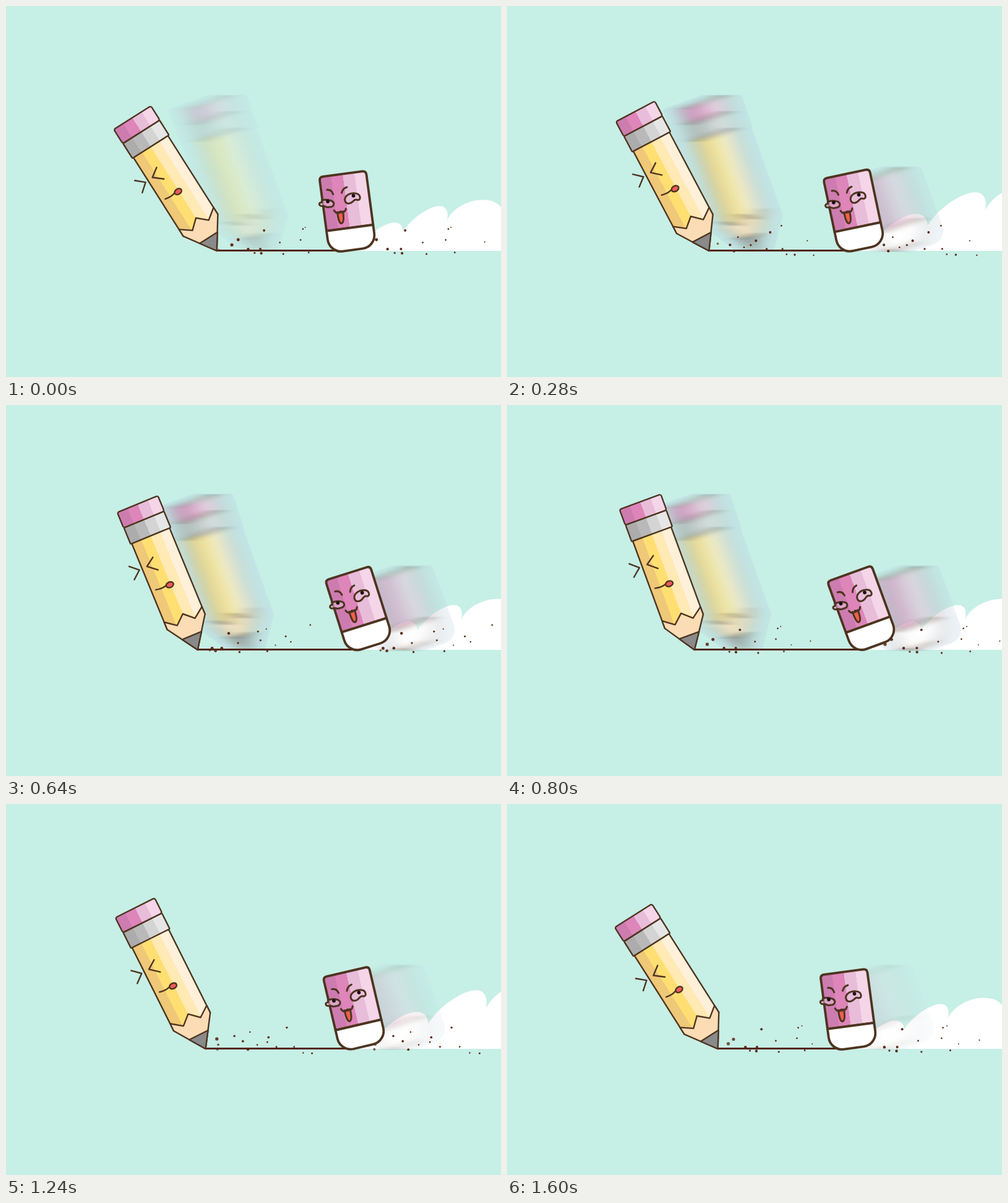
An HTML page that plays this animation: 800 by 600 pixels, repeating every 1640 ms.

```html
<!DOCTYPE html>
<html lang="en">
<head>
<meta charset="utf-8">
<title>Pencil and eraser</title>
<style>
  html, body { margin: 0; width: 100%; height: 100%; overflow: hidden; background: #c6efe6; }
  svg { display: block; width: 800px; height: 600px; }
  .ink { stroke: #4d3420; stroke-linejoin: round; stroke-linecap: round; }
  .bare { fill: none; }
</style>
</head>
<body>
<svg viewBox="0 0 800 600">
  <defs>
    <!-- Sideways blur over a flat bluish halo -->
    <filter id="smear" filterUnits="userSpaceOnUse" x="0" y="100" width="800" height="320" color-interpolation-filters="sRGB">
      <feMorphology in="SourceAlpha" operator="dilate" radius="29 0" result="wide"/>
      <feFlood flood-color="#bcd6e6" flood-opacity=".5"/>
      <feComposite operator="in" in2="wide" result="halo"/>
      <feGaussianBlur in="SourceGraphic" stdDeviation="14 0" result="blur"/>
      <feComposite in="blur" in2="wide" operator="in" result="core"/>
      <feMerge><feMergeNode in="halo"/><feMergeNode in="core"/></feMerge>
    </filter>

    <!-- Origin: tip of the lead -->
    <g id="pencil" class="ink" stroke-width="2.4">
      <rect x="-33" y="-200" width="66" height="151" fill="url(#yellow)"/>
      <path fill="#fcdcb4" d="M-33-62L-15.5-49 0-63 15.5-49 33-62V-49L0 0-33-49Z"/>
      <path fill="#8a8a8a" d="M-17-25H17L0 0Z"/>
      <rect x="-35" y="-228" width="70" height="28.5" rx="1.5" fill="url(#grey)"/>
      <rect x="-35.5" y="-255" width="71" height="27" rx="3" fill="url(#pink)"/>
    </g>
    <g id="pencilFace" class="ink" stroke-width="2.4">
      <path class="bare" d="M-10-166L-24.3-156-10-144M-51-167L-37.8-155.3-51.4-144"/>
      <path class="bare" d="M-25.5-115.5Q-16-113-8-115.5"/>
      <ellipse cx="-1.5" cy="-114.5" rx="6.2" ry="4.4" fill="#ee5a5a"/>
    </g>

    <!-- Origin: middle of the sleeve edge -->
    <g id="eraser" class="ink" stroke-width="3.8">
      <path fill="url(#pink)" d="M-38 0V-82q0-6 6-6H32q6 0 6 6V0Z"/>
      <path fill="#fff" d="M-38 0H38V14A22 22 0 0 1 16 36H-16A22 22 0 0 1-38 14Z"/>
    </g>
    <g id="eraserFace" class="ink" stroke-width="3">
      <path class="bare" d="M-28.5-66Q-21-66-19.5-57.5M4-66Q-3-65-5.5-58"/>
      <g fill="#e8bdd9" fill-opacity=".6">
        <path d="M-39-50Q-31-52-23-47C-18-43-21-37-28-38C-35-37-35-41-38-41C-45-40-46-48-39-47Z"/>
        <path d="M-2-46C-1-53 8-57 17-54C25-52 24-42 19-43C15-45 14-44 11-42C6-38-2-38-2-46Z"/>
      </g>
      <path fill="#f0604a" d="M-16.5-28Q-17-9-12.4-9Q-7-10-7.5-28Q-12-25-16.5-28Z"/>
      <path class="bare" d="M-21.5-31.5Q-18-23-11.7-28.5Q-5-24-2.2-31.5"/>
      <g fill="#1c1010" stroke="none">
        <circle cx="-29.7" cy="-47" r="2.9"/>
        <circle cx="12.7" cy="-50.8" r="2.9"/>
      </g>
    </g>
  </defs>

  <rect width="800" height="600" fill="#c6efe6"/>
  <path id="cloud" fill="#fff" d="M0 0L43.5-34C62-47 84-53 86.5-31C100-58 165-98 157.5-50C172-82 232-95 246-68L400-60V0Z"/>
  <g id="eraserTrail" filter="url(#smear)"><use href="#eraser"/></g>
  <g id="pencilTrail" filter="url(#smear)"><use href="#pencil"/></g>
  <path id="line" stroke="#54260f" stroke-width="3"/>
  <g id="crumbs" fill="#5c2b18"></g>
  <g id="eraserBody"><use href="#eraser"/><use href="#eraserFace"/></g>
  <g id="pencilBody"><use href="#pencil"/><use href="#pencilFace"/></g>
</svg>
<script>
const LOOP = 1640, STEP = 40, GROUND = 396;
const $ = id => document.getElementById(id);
const svg = (name, attrs, parent) => {
  const el = document.createElementNS('http://www.w3.org/2000/svg', name);
  set(el, attrs);
  return parent.appendChild(el);
};
function set(el, attrs) {
  for (const key in attrs) el.setAttribute(key, attrs[key]);
}
const place = (el, x, y, angle) => set(el, { transform: `translate(${x} ${y}) rotate(${-angle})` });

// Four hard-edged bands, dark to light
const bands = {
  pink: ['#cd7cb0', '#de85ba', '#e8bdd9', '#f5d5e8'],
  grey: ['#acacac', '#b9b9b9', '#d4d4d4', '#e6e6e6'],
  yellow: ['#efc878', '#ffdf72', '#ffe9b4', '#fff0d9']
};
for (const id in bands) {
  const gradient = svg('linearGradient', { id }, document.querySelector('defs'));
  bands[id].forEach((color, i) => [i, i + 1].forEach(edge =>
    svg('stop', { offset: edge / 4, 'stop-color': color }, gradient)));
}

let seed = 11;
const random = () => (seed = seed * 16807 % 2147483647) / 2147483647;
const crumbs = Array.from({ length: 15 }, () => ({
  start: random(), reach: 130 + 100 * random(), rise: 52 * random() - 10, size: .8 + 1.6 * random(),
  dots: [0, 1].map(() => svg('circle', {}, $('crumbs')))
}));

// Linear interpolation through [time, value] pairs
function track(keys, t) {
  const i = Math.max(1, keys.findIndex(key => key[0] >= t));
  const [t0, v0] = keys[i - 1], [t1, v1] = keys[i];
  return v0 + (v1 - v0) * (t - t0) / (t1 - t0);
}
const pencilFade = [[0, .35], [280, .75], [480, 0], [640, .75], [1000, .65], [1240, 0], [LOOP, 0]];
const eraserFade = [[0, 0], [280, .45], [480, 0], [640, .5], [1000, .6], [1240, .25], [LOOP, .15]];

function draw(t) {
  const swing = Math.abs(t - 800), curve = swing * swing * 1e-6;
  const tipX = 303 + .041 * swing + 7.7 * curve;
  const eraserX = 583.5 - .028 * swing - 8.5 * curve;

  place($('pencilBody'), tipX, GROUND, 20.15 + .0137 * swing + 2 * curve);
  place($('eraserBody'), eraserX, 355.3 + .0045 * swing, 20 - .0155 * swing);
  set($('line'), { d: `M${tipX} 395.5H${eraserX - 13}` });

  place($('pencilTrail').firstChild, 411 - .036 * t, GROUND, 19.6);
  place($('eraserTrail').firstChild, 661 - .055 * swing, 355.3, 20);
  set($('pencilTrail'), { opacity: track(pencilFade, t) });
  set($('eraserTrail'), { opacity: track(eraserFade, t) });

  const puff = 1 + .31 * (t % 160) / 120;
  set($('cloud'), { transform: `translate(${eraserX} ${GROUND}) scale(${puff})` });

  for (const { start, reach, rise, size, dots } of crumbs) {
    const p = (t / (LOOP / 2) + start) % 1;
    const y = GROUND - 2 - rise * Math.sqrt(p);
    dots.forEach((dot, i) => set(dot, {
      cx: (i ? eraserX + 8 : tipX + 3) + reach * p * (i ? 1 : .9),
      cy: y,
      r: .7 + size * (1 - .7 * p),
      opacity: Math.min(1, .4 + 4 * p)
    }));
  }
}

function frame() {
  const t = performance.now() % LOOP;
  draw(Math.floor(t / STEP) * STEP);
  requestAnimationFrame(frame);
}
frame();
</script>
</body>
</html>
```
